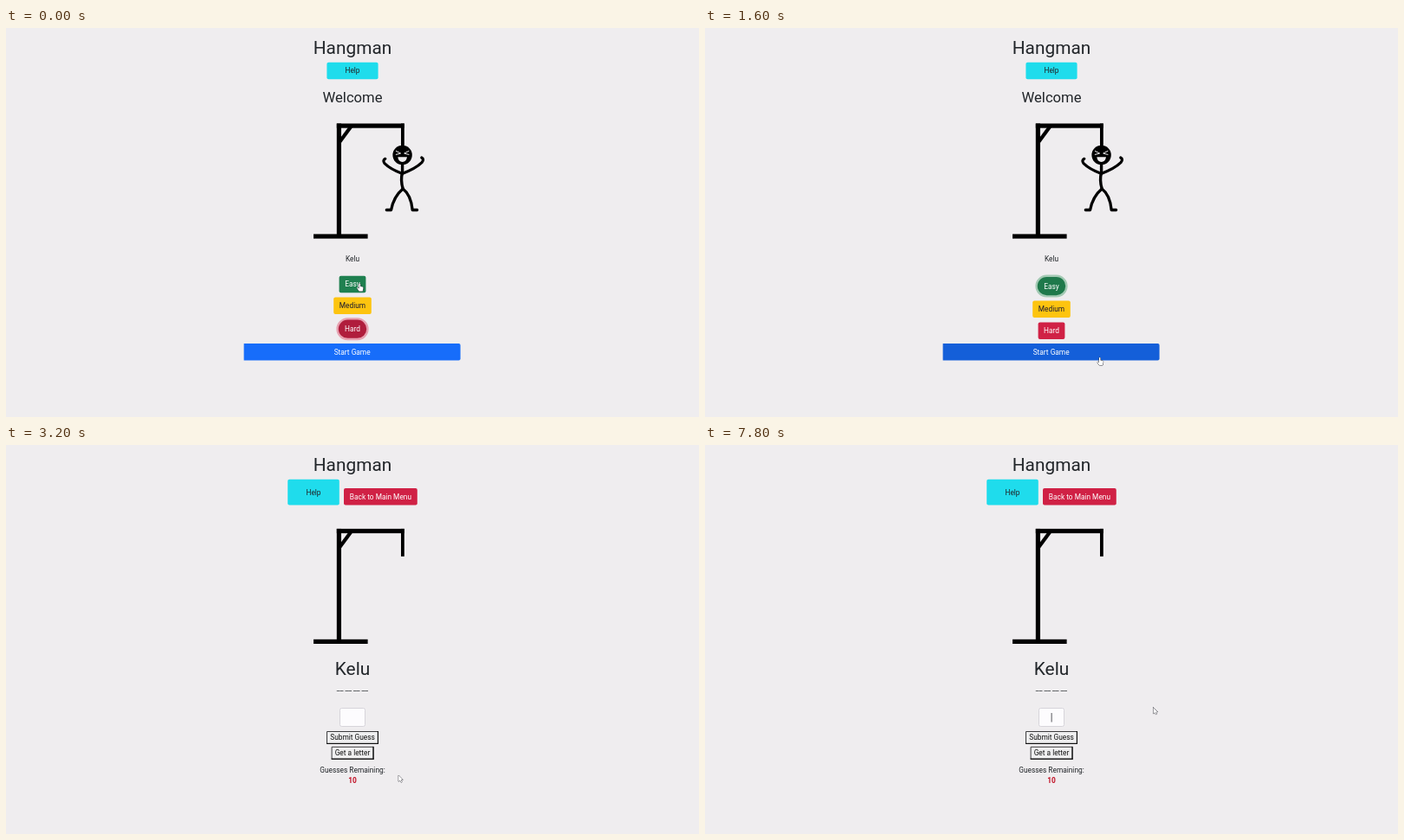
Recreate the animation shown at these times as an HTML page with a canvas. Size 800 by 450 pixels, loop 8 s.

```html
<!DOCTYPE html>
<html lang="en">
<head>
<meta charset="utf-8">
<title>Hangman</title>
<style>
  html, body { margin: 0; width: 100%; height: 100%; overflow: hidden; background: #efedef; }
  canvas { display: block; width: 800px; height: 450px; }
</style>
</head>
<body>
<canvas id="stage" width="800" height="450"></canvas>
<script>
const ctx = document.getElementById('stage').getContext('2d');
const LOOP = 8000, STEP = 200;
const BODY = 800 / 1536 * 16, H1 = BODY * 2.5, H2 = BODY * 2;
const INK = '#212529', PLAYER = 'Kelu';
const GAME_START = 2400, CLICK_EASY = 200, HOVER_START = 1150, CLICK_START = 2000;

// time, pointer kind, hot spot
const POINTER = [
  [0, 'hand', 408.3, 295.5],
  [1000, 'arrow', 431, 338],
  [1200, 'hand', 454.7, 375.5],
  [1400, 'hand', 455.7, 381],
  [2000, 'hand', 455.7, 382.5],
  [2400, 'arrow', 453.2, 382],
  [5200, 'arrow', 378.3, 308],
  [5400, 'beam', 397, 314],
  [6200, 'beam', 408, 320],
  [6400, 'hand', 419.3, 333],
  [7000, 'arrow', 446, 324],
  [7200, 'arrow', 470, 314],
  [7600, 'arrow', 500, 306],
  [7800, 'arrow', 517.5, 303.5]
];

const clamp = v => Math.max(0, Math.min(1, v));

function mix(a, b, k) {
  const part = (c, i) => parseInt(c.substr(1 + i * 2, 2), 16);
  return `rgb(${[0, 1, 2].map(i => Math.round(part(a, i) + (part(b, i) - part(a, i)) * k))})`;
}

// y is the middle of the capitals
function text(str, y, size = BODY, color = INK, x = 400, weight = 400) {
  ctx.font = `${weight} ${size}px Roboto, sans-serif`;
  ctx.textAlign = 'center';
  ctx.fillStyle = color;
  ctx.fillText(str, x, y + size * 0.3555);
}

function box(x, y, w, h, r, fill, stroke, line = 1) {
  ctx.beginPath();
  ctx.roundRect(x, y, w, h, r);
  if (fill) { ctx.fillStyle = fill; ctx.fill(); }
  if (stroke) { ctx.strokeStyle = stroke; ctx.lineWidth = line; ctx.stroke(); }
}

function button(label, x, y, w, h, fill, color = '#fff', r = 2) {
  box(x, y, w, h, r, fill);
  text(label, y + h / 2, BODY, color, x + w / 2);
}

function pill(label, y, fill, ring, width) {
  box(382.6, y, 34.8, 23.6, 11.8, fill);
  box(382.6, y, 34.8, 23.6, 11.8, null, ring, width);
  text(label, y + 11.8, BODY, '#fff');
}

function gallows(dy) {
  ctx.save();
  ctx.translate(0, dy);
  ctx.fillStyle = '#000';
  ctx.fillRect(381.8, 110.5, 78, 5.2);
  ctx.fillRect(381.8, 110.5, 5.2, 130);
  ctx.fillRect(355, 238.4, 62.6, 5.2);
  ctx.fillRect(456, 110.5, 3.8, 32);
  ctx.strokeStyle = '#000';
  ctx.lineWidth = 4.2;
  ctx.beginPath();
  ctx.moveTo(399, 113);
  ctx.lineTo(385, 132);
  ctx.stroke();
  ctx.restore();
}

function trace(d, color, width) {
  ctx.strokeStyle = color;
  ctx.lineWidth = width;
  ctx.stroke(new Path2D(d));
}

function man() {
  ctx.save();
  ctx.lineCap = ctx.lineJoin = 'round';
  trace('M457.6 156V167Q455.2 176 458.2 186', '#000', 3.4);
  trace('M437.8 151.3Q434.4 153 437 156.6Q444 163.5 457.5 168.4', '#000', 3.2);
  trace('M479.8 150Q483.2 151.8 480 155.6Q473 162.5 457.5 168.4', '#000', 3.2);
  trace('M458.2 186Q447.5 195 444.6 210.5H439.3', '#000', 3.3);
  trace('M458.2 186Q467.5 193 469.2 210.5H474.6', '#000', 3.3);
  ctx.fillStyle = '#000';
  ctx.beginPath();
  ctx.arc(457.6, 147, 11.2, 0, 7);
  ctx.fill();
  trace('M450.3 142.3L455.6 145L450.3 146.4M465 142.3L459.7 145L465 146.4', '#efedef', 1);
  ctx.fillStyle = '#efedef';
  ctx.fill(new Path2D('M452.3 149.3H463Q462 155 457.6 155T452.3 149.3Z'));
  ctx.restore();
}

function menu(t) {
  const picked = t >= CLICK_EASY;
  const fade = clamp((t - CLICK_EASY) / 150);
  button('Help', 370.4, 39.7, 59.2, 19.5, '#1fdcec', INK);
  text('Welcome', 79.6, H2);
  gallows(0);
  man();
  text(PLAYER, 266.8);

  if (!picked) {
    button('Easy', 384.6, 286.7, 30.8, 19.6, '#1f8050');
    button('Medium', 378.2, 311.4, 43.6, 19.6, '#fdc40f', '#1c1b30');
    pill('Hard', 336.4, '#b01d3c', '#e7a1b0', 2.4);
  } else {
    const pressed = t >= CLICK_START;
    if (pressed) pill('Easy', 286.8, '#1d8a57', '#000', 2.4);
    else pill('Easy', 286.8, mix('#1f8050', '#1f794b', fade), mix('#1f8050', '#a3cab4', fade), 2.4);
    button('Medium', 378.2, 315.5, 43.6, 19.6, '#fdc40f', '#1c1b30');
    button('Hard', 384.6, 340.4, 30.8, 19.6, '#d02145');
  }

  const hover = clamp((t - HOVER_START) / 200);
  const held = t >= CLICK_START;
  if (held) box(273.4, 363.9, 253, 21.8, 2.5, '#8db3ec');
  button('Start Game', 274.6, 365, 250, 19.6,
    held ? '#1157c2' : mix('#176dfa', '#145fd9', hover), '#fff', [0, 2, 2, 0]);
}

function plainButton(label, x, y, w, h) {
  box(x + 0.5, y + 0.5, w - 1, h - 1, 0, '#efeff0', '#3c3c3e', 1);
  ctx.fillStyle = '#111';
  ctx.fillRect(x, y + h - 1.2, w, 1.2);
  ctx.fillRect(x + w - 1.2, y, 1.2, h);
  text(label, y + h / 2, BODY, '#111');
}

function game(t) {
  button('Help', 325.2, 39.7, 59.6, 29.9, '#1fdcec', INK);
  button('Back to Main Menu', 390, 50, 84.8, 19.6, '#d02145');
  gallows(-13.6);
  text(PLAYER, 259, H1);
  text('__ __ __ __', 281.5);
  box(385.5, 304.5, 29, 21, 2, '#fdfcfe', '#d6d4da');
  const since = t - 5700;
  if (since >= 0 && Math.floor(since / 500) % 2 === 0) {
    ctx.fillStyle = '#55555a';
    ctx.fillRect(399.6, 310, 1, 10.5);
  }
  plainButton('Submit Guess', 370, 331, 60, 15);
  plainButton('Get a letter', 375.6, 348.8, 49, 15);
  text('Guesses Remaining:', 375.7);
  text('10', 388, BODY, '#c00d22', 400, 700);
}

const SHAPES = {
  arrow: 'M0 0V7.2L1.7 5.7L2.8 8.2L3.9 7.7L2.8 5.2H5Z',
  hand: 'M-.7 .6Q0 -.4 .7 .6V3.4L3.4 4Q4.2 4.3 4 5.4L3.4 9H-.6L-2.8 5.8Q-2.6 4.6 -.7 6Z'
};

function pointer(t) {
  const [, kind, x, y] = POINTER.filter(p => p[0] <= t).pop();
  ctx.save();
  ctx.translate(x, y);
  if (kind === 'beam') {
    trace('M-1.5 -4H1.5M0 -4V4M-1.5 4H1.5', '#333', 0.8);
  } else {
    ctx.lineJoin = 'round';
    trace(SHAPES[kind], '#3a3a42', 1);
    ctx.fillStyle = '#fff';
    ctx.fill(new Path2D(SHAPES[kind]));
  }
  ctx.restore();
}

function draw(now) {
  const t = Math.floor(now % LOOP / STEP) * STEP;
  ctx.fillStyle = '#efedef';
  ctx.fillRect(0, 0, 800, 450);
  text('Hangman', 22.7, H1);
  (t < GAME_START ? menu : game)(t);
  pointer(t);
}

const start = performance.now();
function tick() {
  draw(performance.now() - start);
  requestAnimationFrame(tick);
}
tick();
</script>
</body>
</html>
```
